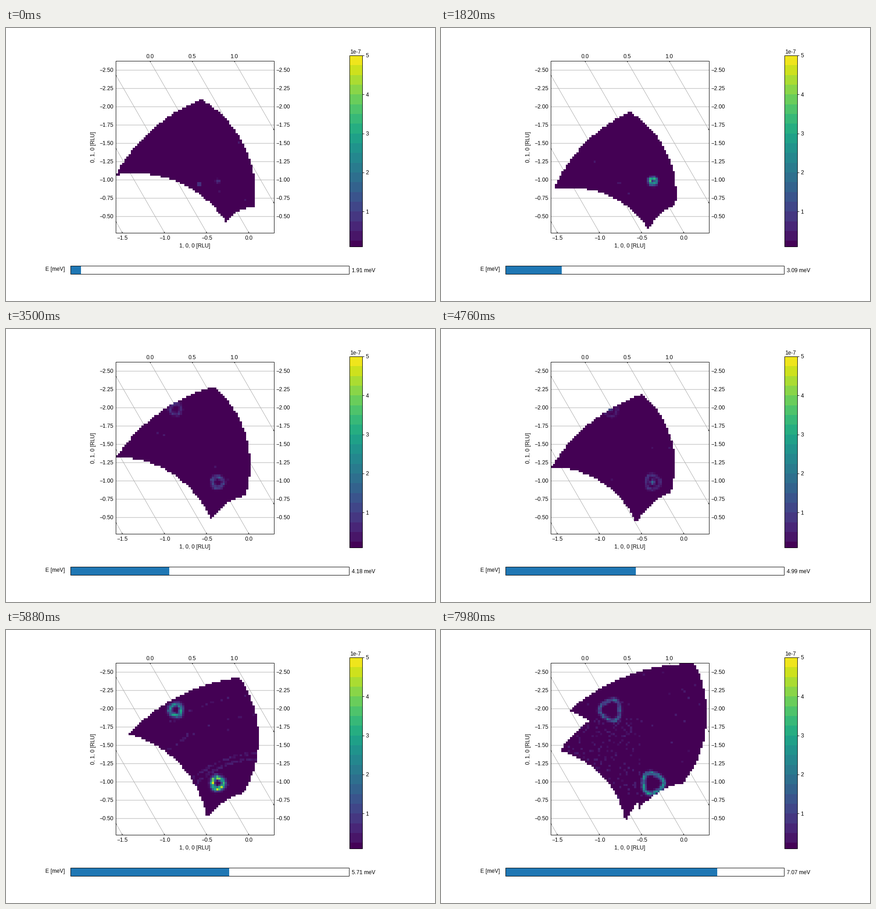
These frames come from a looping animation (938x597 px, 8 s). A matplotlib script:

```python
import numpy as np
import matplotlib.pyplot as plt
from matplotlib.animation import FuncAnimation
from matplotlib.collections import LineCollection
from matplotlib.patches import Rectangle

W, H, DPI = 938, 597, 100
PX = 72 / DPI
STEP, TICK, LOOP = 140, 20, 8000
LEFT, RIGHT, TOP, BOTTOM = 240, 586, 72, 448
COLS, ROWS = 74, 81
X0, Y0 = 556.7, 492.2          # pixel position of Q = 0
UNIT, ROW_UNIT = 184.4, 160    # pixels per reciprocal lattice unit
SLOPE = 2 * ROW_UNIT / UNIT
KAPPA = 108.5                  # pixels of k per sqrt(meV)
EF_MIN, EF_MAX = 3.12, 5.13
VMIN, VMAX = 0.1, 5.0

CW, CH = (RIGHT - LEFT) / COLS, (BOTTOM - TOP) / ROWS
GX, GY = np.meshgrid(LEFT + CW * (np.arange(COLS) + 0.5),
                     TOP + CH * (np.arange(ROWS) + 0.5))
Q, THETA = np.hypot(GX - X0, Y0 - GY), np.degrees(np.arctan2(Y0 - GY, GX - X0))


def energy(n):
    return 1.9135 + 0.0905 * n


def coverage(e):
    """Cells reached by the scans at energy transfer e."""
    seen = np.zeros(GX.shape, bool)
    for j in range(4):
        ei = 6.7 + 1.8 * j
        ef = ei - e
        if not EF_MIN <= ef <= EF_MAX:
            continue
        moved = j > 1                         # detector bank moved inwards
        t_min, t_max = 20.8 - 4.5 * moved, 87.5 - 5.5 * moved
        a_max = 193 - 11.3 * j + 0.78 * j * j
        a_min = a_max - 40.7
        ki, kf = np.sqrt(ei), np.sqrt(ef)
        cos_t = (ei + ef - (Q / KAPPA) ** 2) / (2 * ki * kf)
        t = np.arccos(np.clip(cos_t, -1, 1))
        turn = THETA + np.degrees(np.arctan2(kf * np.sin(t), ki - kf * np.cos(t)))
        deg = np.degrees(t)
        seen |= (deg >= t_min) & (deg <= t_max) & (turn >= a_min) & (turn <= a_max)
    return seen


def ring(r, a, e, gap, speed, blur, sign):
    """Constant-energy cut through a gapped cone, slightly triangular."""
    radius = speed * np.sqrt(max(e * e - gap * gap, 0))
    fade = np.exp(-max(gap - e, 0) / blur)
    bent = radius * (1 + 0.1 * sign * min(radius / 22, 1) * np.cos(3 * a))
    return fade * np.exp(-((r - bent) / 4.6) ** 2)


def field(n):
    rng = np.random.default_rng(100 + n)
    e = energy(n)
    low = 4.4 * (2.64 / e) ** 2.8
    high = 4.8 / (1 + 0.75 * max(e - 5.4, 0))
    val = np.zeros(GX.shape)
    for k, gain, sign in ((-1, 1, 1), (-2, 0.62, -1)):
        dx = GX - (X0 + k * UNIT / 2 - 1.5)
        dy = Y0 + k * ROW_UNIT + 2.8 - GY
        r, a = np.hypot(dx, dy), np.arctan2(dy, dx)
        val += gain * (low * ring(r, a, e, 2.5, 3.5, 0.25, sign)
                       + high * ring(r, a, e, 5.05, 4.4, 0.1, sign))
    val *= rng.uniform(0.6, 1.25, val.shape)

    # faint background: stray cells, powder arcs, late speckle
    chance = np.full(val.shape, 0.0012)
    arcs = np.exp(-((e - 5.71) / 0.14) ** 2)
    for q in (211, 223, 305, 350):
        near = (np.abs(Q - q) < 3) & (GX > 345)
        chance += arcs * 0.85 * (200 / q) ** 2.5 * near
    late = np.clip((e - 6.25) / 0.8, 0, 1)
    chance += late * np.where((GX < 440) & (GY > 195) & (GY < 370), 0.12, 0.01)
    val += rng.uniform(0.25, 0.5, val.shape) * (rng.random(val.shape) < chance)

    # spurious spot drifting left while it fades
    spot = (np.abs(GX - 421 + 2.4 * n) < 5) & (np.abs(GY - 342 + 0.2 * n) < 3.5)
    val += spot * 0.8 * np.exp(-n / 17)
    return np.ma.array(val, mask=~coverage(e))


def num(v, digits):
    return f"{v:.{digits}f}".replace("-", "\u2212")


plt.rcParams["font.family"] = "Liberation Sans"
fig = plt.figure(figsize=(W / DPI, H / DPI), dpi=DPI, facecolor="white")
ax = fig.add_axes([0, 0, 1, 1])
ax.axis("off")


def label(x, y, s, ha="left", va="baseline", **kw):
    return ax.text(x, y, s, ha=ha, va=va, fontsize=12 * PX, color="black", **kw)


def lines(segs, color, z, **kw):
    ax.add_collection(LineCollection(segs, colors=color, linewidths=PX,
                                     zorder=z, **kw), autolim=False)


def box(x0, y0, x1, y1, z=5, **kw):
    style = dict(fill=False, ec="black", lw=PX) | kw
    return ax.add_patch(Rectangle((x0, y0), x1 - x0, y1 - y0, zorder=z, **style))


# oblique grid with short inward ticks
grid, ticks = [], []
for k in np.arange(-2.5, -0.4, 0.25):
    y = Y0 + k * ROW_UNIT
    grid.append([(LEFT, y), (RIGHT, y)])
    label(235, y + 4, num(k, 2), "right")
    label(590, y + 4, num(k, 2))

along = np.array([1, SLOPE]) / np.hypot(1, SLOPE)
for h in np.arange(-1.5, 1.1, 0.5):
    base = X0 + UNIT * h
    ya = max(TOP, Y0 - SLOPE * (base - LEFT))
    yb = min(BOTTOM, Y0 - SLOPE * (base - RIGHT))
    a, b = (np.array([base - (Y0 - y) / SLOPE, y]) for y in (ya, yb))
    grid.append([a, b])
    ticks += [[a, a + 3 * along], [b, b - 3 * along]]
    if ya == TOP:
        label(a[0], 66, num(h, 1), "center")
    if yb == BOTTOM:
        label(b[0], 463, num(h, 1), "center")

lines(grid, "#b0b0b0", 1, snap=False)
lines(ticks, "black", 4)
box(LEFT, TOP, RIGHT, BOTTOM)
label(413, 480, "1, 0, 0 [RLU]", "center")
label(191, 260, "0, 1, 0 [RLU]", "center", "center", rotation=90)

# colour bar in steps of 0.25
BAR_TOP, BAR_BOTTOM = 60, 478


def bar_y(v):
    return BAR_BOTTOM - (v - VMIN) / (VMAX - VMIN) * (BAR_BOTTOM - BAR_TOP)


edges = np.linspace(0, VMAX, 21)
mids = (edges[:-1] + edges[1:]) / 2
edges[0] = VMIN
ax.pcolormesh([751, 779], bar_y(edges), mids[:, None], cmap="viridis",
              vmin=VMIN, vmax=VMAX, zorder=2)
box(751, BAR_TOP, 779, BAR_BOTTOM)
for v in range(1, 6):
    label(786.5, bar_y(v) + 4.3, str(v))
lines([[(779, bar_y(v)), (783, bar_y(v))] for v in range(1, 6)], "black", 4)
label(752, 56, "1e-7")

# slider
fill = box(141, 520, 163.5, 538, z=3, fill=True, fc="#1f77b4", ec="none")
box(141, 520, 750, 538)
label(128.5, 531.5, "E [meV]", "right")
readout = label(755.5, 534, "")

STATES = [field(n) for n in range((LOOP - 1) // STEP + 1)]
mesh = ax.imshow(STATES[0], cmap="viridis", vmin=VMIN, vmax=VMAX, aspect="auto",
                 interpolation="nearest", extent=(LEFT, RIGHT, BOTTOM, TOP), zorder=2)
ax.set_xlim(0, W)
ax.set_ylim(H, 0)


def update(i):
    n = i * TICK // STEP
    mesh.set_data(STATES[n])
    fill.set_width(22.5 + 7.73 * n)
    readout.set_text(f"{energy(n):.2f} meV")
    return mesh, fill, readout


anim = FuncAnimation(fig, update, frames=LOOP // TICK, interval=TICK,
                     repeat=True, repeat_delay=0, blit=False)
plt.show()
```
